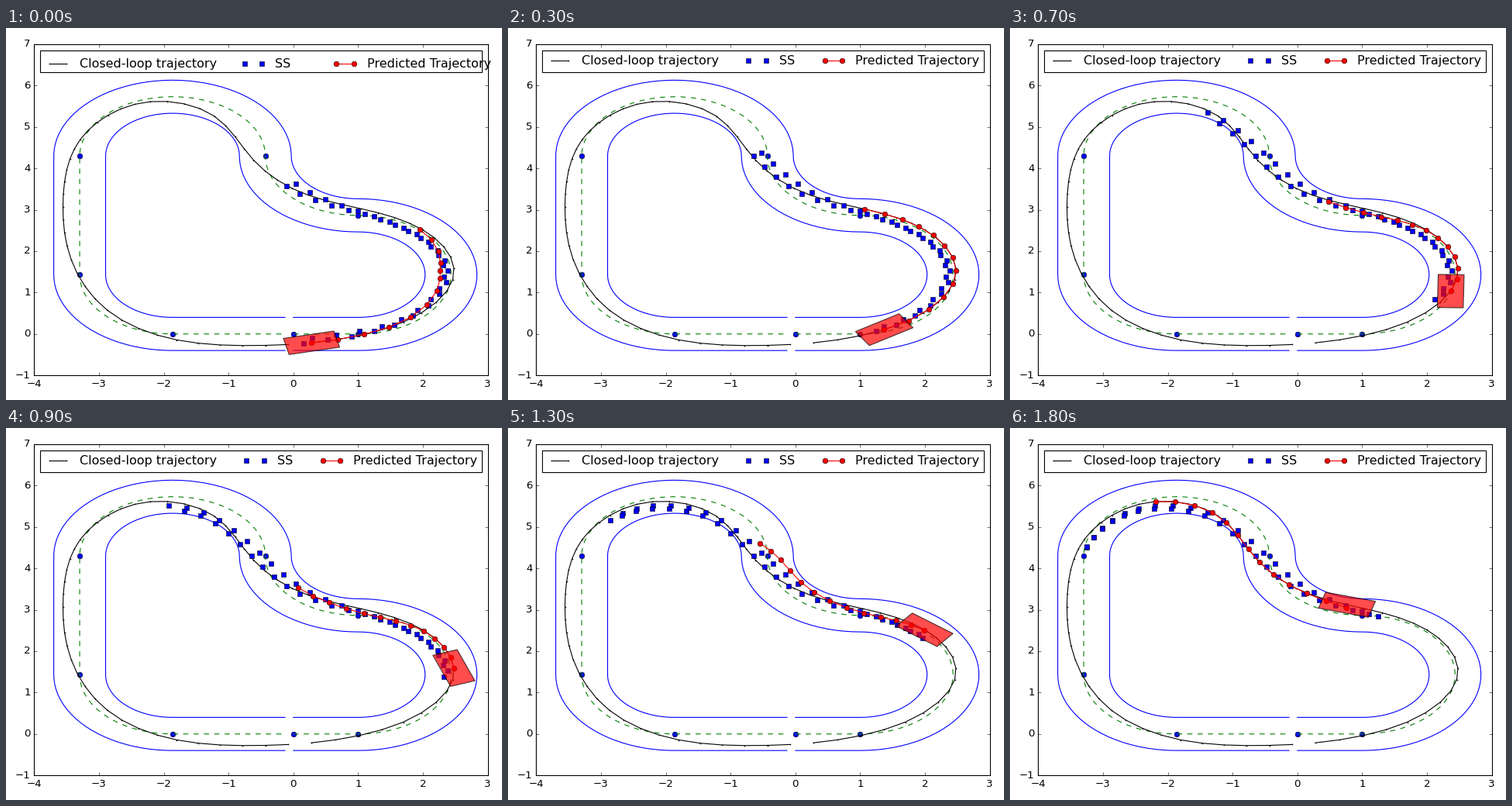
A matplotlib script that plays this animation: 640 px wide and 480 px high, repeating every 1900 ms.

```python
import numpy as np
import matplotlib.pyplot as plt
from matplotlib.animation import FuncAnimation
from matplotlib.patches import Polygon, Rectangle

plt.style.use("classic")
plt.rcParams.update({
    "font.family": "DejaVu Sans",
    "savefig.dpi": "figure",
    "lines.markeredgecolor": "k",
    "lines.markeredgewidth": 0.5,
})

W, H, DPI = 640, 480, 80
LEFT, RIGHT, TOP, BOTTOM = 36.3, 621.7, 20.8, 448.2
FRAMES = 19
HORIZON = 13
WINDOW = 22          # safe-set points shown per lap
LAP_STEPS = 62

R = 4.5 / np.pi
HALF_WIDTH = 0.4
SEGMENTS = [(1, 0), (4.5, R), (2.25, -R), (4.5, R),
            (2 * R, 0), (2.25, R), (2 * R - 1, 0)]


def to_data(px):
    """Stage pixels (y down) to plot coordinates."""
    px = np.asarray(px, float) - 0.5
    x = (px[..., 0] - LEFT) * 7 / (RIGHT - LEFT) - 4
    y = (BOTTOM - px[..., 1]) * 8 / (BOTTOM - TOP) - 1
    return np.stack([x, y], axis=-1)


def spline(t, knots, points):
    """Natural cubic spline through the points, evaluated at times t."""
    t, k, p = (np.asarray(a, float) for a in (t, knots, points))
    h, n = np.diff(k), len(k)
    system, rhs = np.eye(n), np.zeros_like(p)
    for i in range(1, n - 1):
        system[i, i - 1:i + 2] = h[i - 1], 2 * (h[i - 1] + h[i]), h[i]
        rhs[i] = 6 * ((p[i + 1] - p[i]) / h[i] - (p[i] - p[i - 1]) / h[i - 1])
    m = np.linalg.solve(system, rhs)
    i = np.clip(np.searchsorted(k, t, side="right") - 1, 0, n - 2)
    hi = h[i][:, None]
    a = (k[i + 1] - t)[:, None] / hi
    b = 1 - a
    return (a * p[i] + b * p[i + 1]
            + ((a ** 3 - a) * m[i] + (b ** 3 - b) * m[i + 1]) * hi ** 2 / 6)


def bump(t, centre, width):
    return np.exp(-((t - centre) / width) ** 2)


def advance(pose, radius, dist):
    x, y, psi = pose
    if radius == 0:
        return x + dist * np.cos(psi), y + dist * np.sin(psi), psi
    end = psi + dist / radius
    return (x + radius * (np.sin(end) - np.sin(psi)),
            y - radius * (np.cos(end) - np.cos(psi)), end)


def build_track():
    """Segment start points and poses every 0.1 along the centre line."""
    starts, poses = [], []
    pose, s0, s = (0.0, 0.0, 0.0), 0.0, 0.0
    for length, radius in SEGMENTS:
        starts.append(pose[:2])
        while s < s0 + length - 1e-9:
            poses.append(advance(pose, radius, s - s0))
            s = len(poses) * 0.1
        pose = advance(pose, radius, length)
        s0 += length
    return np.array(starts), np.array(poses[:int(10 * s0)])


def offset(poses, d):
    x, y, psi = poses.T
    return x - d * np.sin(psi), y + d * np.cos(psi)


# Key points every four time steps, in stage pixels
LAP_KEYS = [
    (394.7, 406.7), (513, 380), (577, 325), (553, 271), (481, 239),
    (390, 216), (320, 171), (269, 114), (187, 95.5), (118, 122.5),
    (83, 169.5), (74, 231), (84.5, 299), (131, 364.5), (221, 403), (335, 410)]
SAFE_KEYS_A = [
    (384.5, 407), (502, 383), (568.5, 328.5), (545, 276.5), (475.5, 243.5),
    (392.5, 212.5), (327.5, 161.5), (255.5, 109.5), (166.5, 104.5),
    (108.5, 141.5), (81, 196)]
SAFE_KEYS_B = [
    (395, 400), (510.5, 376.5), (565.5, 321), (535, 271.5), (463.5, 241),
    (379.5, 214.5), (317.5, 165.5), (251.5, 113.5), (165.5, 107.5),
    (108.5, 141.5), (82, 196)]


def lap(t):
    """Position on the driven lap, a closed curve."""
    k = 4 * np.arange(len(LAP_KEYS))
    knots = np.concatenate([k - LAP_STEPS, k, k + LAP_STEPS])
    return spline(np.atleast_1d(t), knots, LAP_KEYS * 3)


def safe_lap(keys):
    knots = 4 * np.arange(len(keys))
    return spline(np.arange(knots[-1]), knots, keys)


# Sideways drift of the plan: place on the lap, width, pixels to the left,
# and its strength over time
DRIFTS = [
    (8.7, 2.8, 18, (0, 3), (1, 0)),
    (16.5, 2.5, 5.5, (3, 5), (0, 1)),
    (23.3, 3, -23, (7, 12, 15, 18), (0, 1, 1, 0)),
]


def prediction(k):
    """Planned path: the lap ahead at a varying pace, plus drift."""
    pace = np.interp(k, (0, 3, 5, 10, 14, 18),
                     (1.1, 1.16, 1.03, 0.96, 0.98, 1.16))
    t = k + pace * np.arange(HORIZON)
    tangent = lap(t + 0.1) - lap(t - 0.1)
    tangent /= np.linalg.norm(tangent, axis=1, keepdims=True)
    left = tangent[:, ::-1] * (1, -1)
    shift = sum(height * bump(t, centre, width) * np.interp(k, when, level)
                for centre, width, height, when, level in DRIFTS)
    return to_data(lap(t) + left * shift[:, None])


def heading(k):
    """Direction of travel plus a slip angle that peaks in the bend."""
    dx, dy = (to_data(lap(k + 1)) - to_data(lap(k - 1)))[0]
    return np.arctan2(dy, dx) + np.radians(4 + 20 * bump(k, 7, 2.9))


def car_outline(k):
    c, s = np.cos(heading(k)), np.sin(heading(k))
    box = np.array([(0.4, 0.2), (0.4, -0.2), (-0.4, -0.2), (-0.4, 0.2)])
    return to_data(lap(k)) + box @ np.array([(c, s), (-s, c)])


fig = plt.figure(figsize=(W / DPI, H / DPI), dpi=DPI, facecolor="white")
ax = fig.add_axes([LEFT / W, 1 - BOTTOM / H,
                   (RIGHT - LEFT) / W, (BOTTOM - TOP) / H])
ax.set_xlim(-4, 3)
ax.set_ylim(-1, 7)

corners, poses = build_track()
ax.plot(*corners.T, "o", color="b")
ax.plot(*offset(poses, 0), "--", color="g")
for side in (-HALF_WIDTH, HALF_WIDTH):
    ax.plot(*offset(poses, side), "-", color="b")

LAP_STYLE = dict(color="k", marker=".", ms=2)
SAFE_STYLE = dict(color="b", marker="s", ls="none")
PRED_STYLE = dict(color="r", marker="o")

safe_a, safe_b = safe_lap(SAFE_KEYS_A), safe_lap(SAFE_KEYS_B)
ax.plot(*to_data(lap(np.arange(LAP_STEPS))).T, **LAP_STYLE)
safe_line, = ax.plot([], [], **SAFE_STYLE)
pred_line, = ax.plot([], [], **PRED_STYLE)
car = Polygon(np.zeros((4, 2)), closed=True, fc="r", ec="k",
              alpha=0.7, zorder=10)
ax.add_patch(car)

# Legend, laid out in stage pixels
overlay = fig.add_axes([0, 0, 1, 1])
overlay.set_xlim(0, W)
overlay.set_ylim(H, 0)
overlay.axis("off")
overlay.add_patch(Rectangle((44, 29), 570, 28, fc="w", ec="k", lw=1))
entries = []
for label, style in [("Closed-loop trajectory", LAP_STYLE), ("SS", SAFE_STYLE),
                     ("Predicted Trajectory", PRED_STYLE)]:
    handle, = overlay.plot([], [], **style)
    entries.append((handle, overlay.text(0, 0, label, size=14.4)))

# Column starts and baseline; the legend settles after its first drawing
FIRST_LAYOUT = (50.4, 302.2, 421), 50.6
LAYOUT = (50.4, 305, 403.3), 47


def place_legend(columns, baseline):
    for x, (handle, text) in zip(columns, entries):
        handle.set_data([x + 5.3, x + 27.7], [baseline - 5] * 2)
        text.set_position((x + 44.8, baseline))


def draw(k):
    place_legend(*(FIRST_LAYOUT if k == 0 else LAYOUT))
    a, b = min(k, 16), min(round(0.92 * k), 16)
    safe = np.vstack([safe_a[a:a + WINDOW], safe_b[b:b + WINDOW]])
    safe_line.set_data(*to_data(safe).T)
    pred_line.set_data(*prediction(k).T)
    car.set_xy(car_outline(k))
    return safe_line, pred_line, car


anim = FuncAnimation(fig, draw, frames=FRAMES, interval=100, repeat=True)
plt.show()
```
